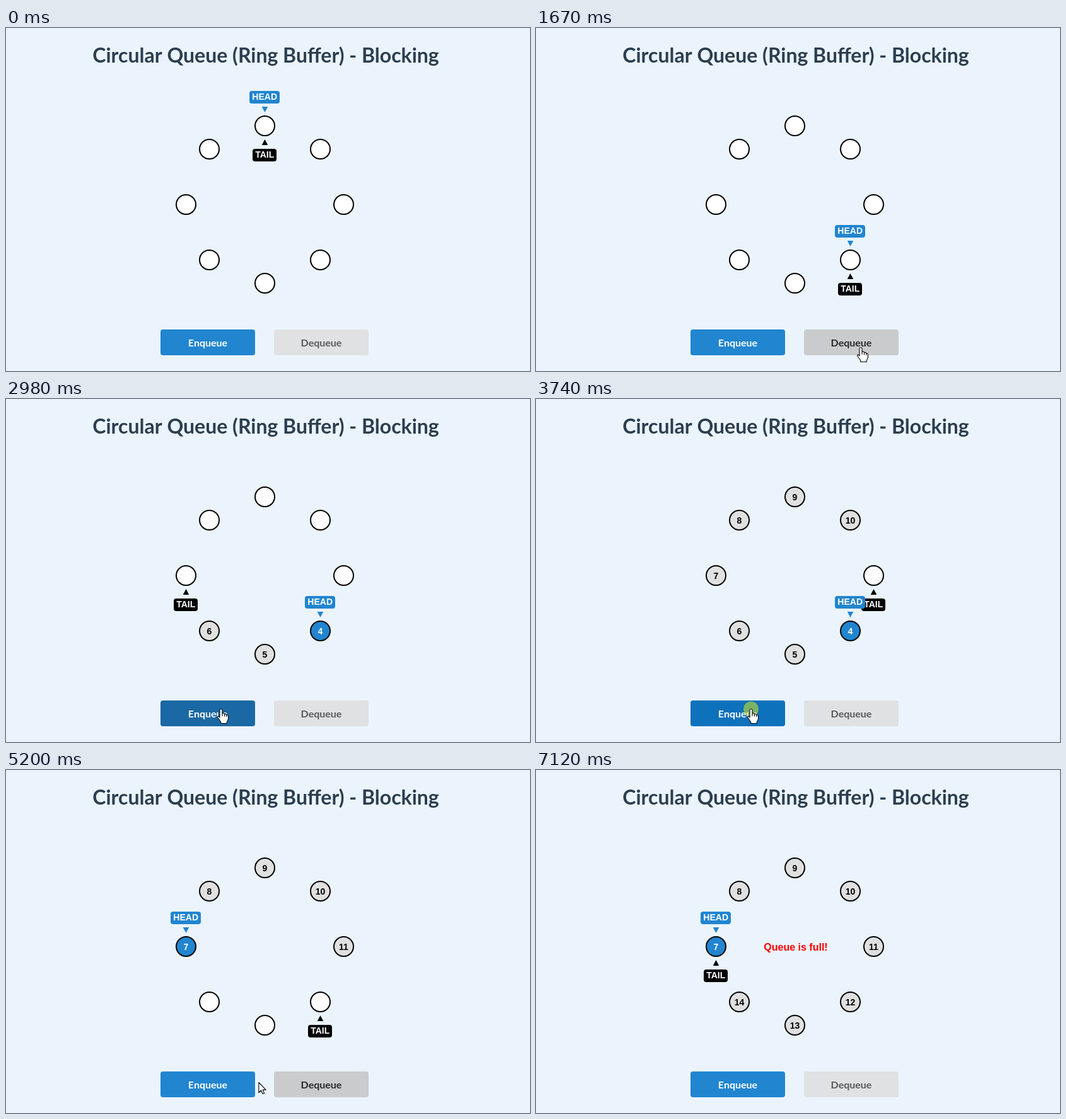
An HTML page with a canvas for the animation above (7200 ms loop, 831x545 px).

```html
<!DOCTYPE html>
<html lang="en">
<head>
<meta charset="utf-8">
<title>Circular Queue</title>
<style>
  html, body { margin: 0; width: 100%; height: 100%; overflow: hidden; background: #ebf4fc; }
  canvas { display: block; width: 831px; height: 545px; }
</style>
</head>
<body>
<canvas id="stage"></canvas>
<script>
const W = 831, H = 545, LOOP = 7200, STEP = 1000 / 13, START = 42.8;
const SLOTS = 8, BLUE = '#2185d0';
const LATO = 'Lato, sans-serif', ARIAL = '"Liberation Sans", Arial, sans-serif';

const canvas = document.getElementById('stage');
const ctx = canvas.getContext('2d');
const ratio = window.devicePixelRatio || 1;
canvas.width = W * ratio;
canvas.height = H * ratio;
ctx.scale(ratio, ratio);

// Button state colours: background, then label
const enqueue = {
  label: 'Enqueue', x: 245,
  idle: [33, 133, 208, 255, 255, 255], hover: [22, 120, 194, 255, 255, 255],
  focus: [13, 113, 187, 255, 255, 255], active: [26, 105, 164, 255, 255, 255]
};
const dequeue = {
  label: 'Dequeue', x: 425,
  idle: [224, 225, 226, 90, 90, 91], hover: [202, 203, 205, 40, 41, 41],
  focus: [202, 203, 205, 40, 41, 41], active: [186, 187, 188, 19, 19, 19]
};
const buttons = [enqueue, dequeue];

const clicks = [
  [enqueue, [280, 500, 720]],
  [dequeue, [1150, 1370, 1590, 1830]],
  [enqueue, [2380, 2600, 2820, 3040, 3260, 3450, 3650, 3880, 4110]],
  [dequeue, [4680, 4900, 5115]],
  [enqueue, [5430, 5660, 5890, 6120]]
].flatMap(([button, times]) => times.map(time => ({ button, time })));

const PRESS = 142, BLUR = 7045, LEAVE = 6520;

// Pointer path: time, x, y
const path = [
  [40, 490, 501], [185, 341, 492], [730, 341, 492], [960, 515, 507],
  [2040, 515, 507], [2220, 341, 492], [4350, 341, 492], [4530, 475, 497],
  [5125, 475, 497], [5197, 400, 496], [5275, 350, 495], [6415, 350, 495],
  [6505, 545, 516], [LEAVE, 555, 518]
];

function pointerAt(t) {
  if (t < path[0][0] || t >= LEAVE) return null;
  const i = path.findIndex(p => p[0] > t);
  const [t0, x0, y0] = path[i - 1], [t1, x1, y1] = path[i];
  const k = (t - t0) / (t1 - t0);
  return { x: x0 + (x1 - x0) * k, y: y0 + (y1 - y0) * k };
}

const inside = (p, b) => p && p.x >= b.x && p.x < b.x + 150 && p.y >= 479 && p.y < 520;

function buttonState(b, t) {
  const pressed = clicks.filter(c => t >= c.time - PRESS);
  const last = pressed[pressed.length - 1];
  if (last && last.button === b && t < BLUR) return t < last.time ? b.active : b.focus;
  return inside(pointerAt(t), b) ? b.hover : b.idle;
}

// Averaging recent states gives a short linear transition
function buttonColors(b, t) {
  const n = 14, sum = [0, 0, 0, 0, 0, 0];
  for (let i = 0; i < n; i++) {
    buttonState(b, t - i * 5).forEach((v, j) => { sum[j] += v / n; });
  }
  const rgb = c => `rgb(${c.map(Math.round).join(',')})`;
  return [rgb(sum.slice(0, 3)), rgb(sum.slice(3))];
}

function queueAt(t) {
  const q = { head: 0, tail: 0, count: 0, next: 1, cells: Array(SLOTS).fill(null), message: '' };
  for (const { button, time } of clicks) {
    if (time > t) break;
    q.message = '';
    if (button === enqueue) {
      if (q.count === SLOTS) { q.message = 'Queue is full!'; continue; }
      q.cells[q.tail] = q.next++;
      q.tail = (q.tail + 1) % SLOTS;
      q.count++;
    } else {
      if (!q.count) { q.message = 'Queue is empty!'; continue; }
      q.cells[q.head] = null;
      q.head = (q.head + 1) % SLOTS;
      q.count--;
    }
  }
  return q;
}

function text(str, x, y, font, color) {
  ctx.font = font;
  ctx.fillStyle = color;
  ctx.textAlign = 'center';
  ctx.fillText(str, x, y);
}

function box(x, y, w, h, r, color) {
  ctx.fillStyle = color;
  ctx.beginPath();
  ctx.roundRect(x, y, w, h, r);
  ctx.fill();
}

function disc(x, y, r, color) {
  ctx.fillStyle = color;
  ctx.beginPath();
  ctx.arc(x, y, r, 0, Math.PI * 2);
  ctx.fill();
}

function triangle(x, base, tip, color) {
  ctx.fillStyle = color;
  ctx.beginPath();
  ctx.moveTo(x - 4.8, base);
  ctx.lineTo(x + 4.8, base);
  ctx.lineTo(x, tip);
  ctx.fill();
}

function slot(i) {
  const a = i * Math.PI * 2 / SLOTS;
  return {
    x: 410.5 + Math.round(125 * Math.sin(a)),
    y: 280.5 - Math.round(125 * Math.cos(a))
  };
}

function drawCell(q, i) {
  const { x, y } = slot(i), value = q.cells[i];
  const first = value !== null && i === q.head;
  disc(x, y, 15.5, value === null ? '#fff' : first ? BLUE : '#e0e0e0');
  ctx.strokeStyle = '#000';
  ctx.lineWidth = 2;
  ctx.stroke();
  if (value !== null) text(value, x, y + 5, `bold 14px ${ARIAL}`, first ? '#fff' : '#000');
}

function drawTag(label, x, top, width, color) {
  box(x - 0.5 - width / 2, top, width, 20, 4, color);
  text(label, x - 0.3, top + 14, `bold 14px ${ARIAL}`, '#fff');
}

function drawTail(i) {
  const { x, y } = slot(i);
  triangle(x, y + 30.5, y + 21.5, '#000');
  drawTag('TAIL', x, y + 36.5, 38, '#000');
}

function drawHead(i) {
  const { x, y } = slot(i);
  drawTag('HEAD', x, y - 55.5, 48, BLUE);
  triangle(x, y - 30.5, y - 21.5, BLUE);
}

function drawButton(b, t) {
  const [back, front] = buttonColors(b, t);
  box(b.x, 479, 150, 41, 4, back);
  text(b.label, b.x + 75, 506, `bold 16px ${LATO}`, front);
}

const arrow = new Path2D('M.5 .5V16.5L4.2 13 6.6 18.6 9.2 17.5 6.8 12.1H11.8Z');
const hand = new Path2D('M-2 2Q0-1 2 2V7.5Q4.5 6 5.5 8.7 7.8 7.5 8.7 10 11.3 9 11.5 12.3' +
  'V16Q11 19 9.3 21V23.5H-.2V21.5Q-2 18.5-4.8 15-6.3 11.8-3.7 12.2L-2 14Z');
const knuckles = new Path2D('M2 7.5V12M5.5 8.7V12.5M8.7 10V13');

function drawPointer(t) {
  const p = pointerAt(t);
  if (!p) return;
  if (clicks.some(c => t >= c.time - 150 && t < c.time - 80)) {
    disc(p.x, p.y + 0.5, 12, 'rgba(255,255,0,.46)');
  }
  const over = buttons.some(b => inside(p, b));
  const shape = over ? hand : arrow;
  ctx.save();
  ctx.translate(p.x, p.y);
  ctx.lineJoin = 'round';
  ctx.lineWidth = 1.1;
  ctx.fillStyle = '#fff';
  ctx.strokeStyle = '#000';
  ctx.fill(shape);
  ctx.stroke(shape);
  if (over) ctx.stroke(knuckles);
  ctx.restore();
}

function draw(now) {
  const time = now % LOOP;
  const t = time < 70 ? 0 : START + STEP * Math.floor((time - START) / STEP);
  const q = queueAt(t);
  ctx.fillStyle = '#ebf4fc';
  ctx.fillRect(0, 0, W, H);
  text('Circular Queue (Ring Buffer) - Blocking', 412, 55, `bold 32px ${LATO}`, '#2c3e50');
  for (let i = 0; i < SLOTS; i++) drawCell(q, i);
  drawTail(q.tail);
  drawHead(q.head);
  if (q.message) text(q.message, 412, 287, `bold 16px ${ARIAL}`, '#f00');
  buttons.forEach(b => drawButton(b, t));
  drawPointer(t);
}

const origin = performance.now();
function tick() {
  draw(performance.now() - origin);
  requestAnimationFrame(tick);
}
tick();
</script>
</body>
</html>
```
